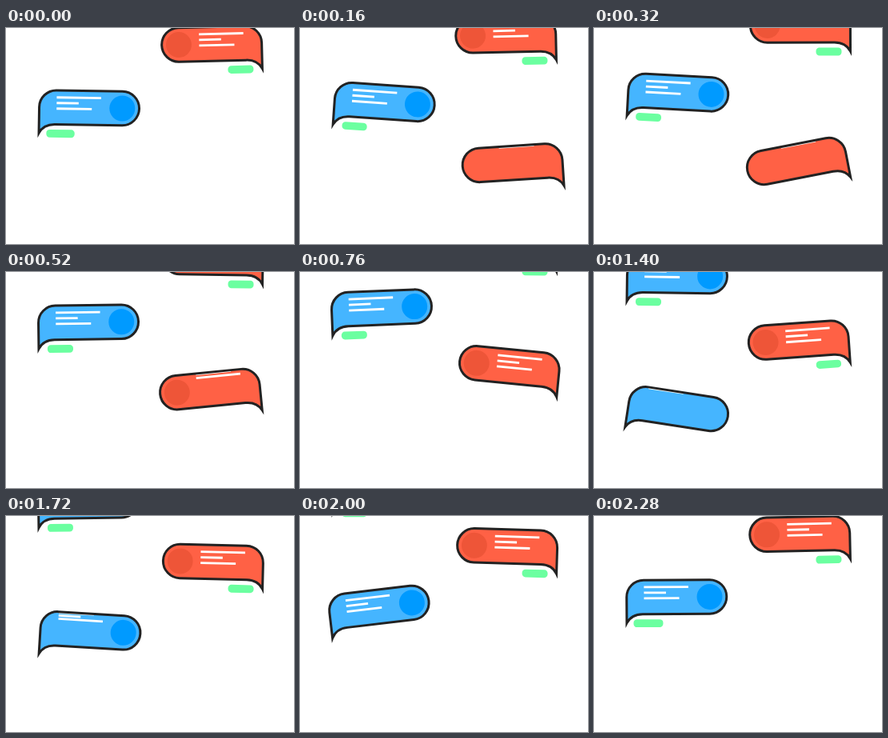
Animation, 360 px wide and 270 px high, one loop 2320 ms. Source, as an HTML page with a canvas:

```html
<!DOCTYPE html>
<html lang="en">
<head>
<meta charset="utf-8">
<title>Chat bubbles</title>
<style>
html, body { margin: 0; width: 100%; height: 100%; overflow: hidden; background: #fff; }
canvas { display: block; width: 360px; height: 270px; }
</style>
</head>
<body>
<canvas id="stage"></canvas>
<script>
const LOOP = 2320, STEP = 40, SPEED = 157 / LOOP;
const canvas = document.getElementById('stage');
const ctx = canvas.getContext('2d');
const dpr = window.devicePixelRatio || 1;
canvas.width = 360 * dpr;
canvas.height = 270 * dpr;

// side is the direction from the tail to the round end
const kinds = [
  { x: 321.5, y: 210.6, side: -1, delay: 0, fill: '#ff6145', disc: '#ee5538' },
  { x: 40, y: 212.6, side: 1, delay: LOOP / 2, fill: '#45b5ff', disc: '#009aff' }
];
const widths = [55.5, 27.5, 44];

// Progress from 0 to 1 between two ages
function ease(age, from, to) {
  const u = Math.min(1, Math.max(0, (age - from) / (to - from)));
  return (1 - Math.cos(Math.PI * u)) / 2;
}

// Damped oscillations
const swing = age =>
  0.276 * Math.exp(-age / 1020) * Math.sin(Math.PI * (age - 115) / 508);
const stretch = age => age < 850 ? 0 :
  1 - Math.exp((850 - age) / 145) * Math.cos(Math.PI * (age - 850) / 270);
const slide = age => 140 * Math.exp(-age / 60);

// The origin is the visible end of the tail
const body = new Path2D(
  'M1 -2.9V-35.25A21.25 21.25 0 0 1 22.25 -56.5H104.75' +
  'A21.25 21.25 0 0 1 104.75 -14H21C12 -14 5 -10.5 1 -2.9Z');

function drawPill(age) {
  const s = stretch(age);
  if (s <= 0) return;
  const w = 32 * s, h = 9.8 * Math.min(1, s);
  ctx.fillStyle = '#6bffa0';
  ctx.beginPath();
  ctx.roundRect(28 - w / 2, -2.5 - h / 2, w, h, Math.min(4.2, h / 2, w / 2));
  ctx.fill();
}

function drawContent(kind, age) {
  ctx.save();
  ctx.clip(body);
  ctx.fillStyle = kind.disc;
  ctx.beginPath();
  ctx.arc(104.75, -35.25, 16 * ease(age, 340, 500), 0, 2 * Math.PI);
  ctx.fill();

  ctx.fillStyle = '#fff';
  widths.forEach((w, i) => {
    const begin = 400 + 80 * i;
    const y = -47.7 + 7 * i - 22 * (1 - ease(age, begin, begin + 160));
    ctx.fillRect(kind.side > 0 ? 22.7 : 79.2 - w, y - 1.4, w, 2.8);
  });
  ctx.restore();
}

function drawBubble(kind, age) {
  const size = ease(age, 40, 160);
  if (size <= 0) return;
  ctx.save();
  ctx.translate(kind.x - kind.side * slide(age), kind.y - age * SPEED);
  ctx.scale(kind.side * size, size);
  ctx.rotate(swing(age));
  drawPill(age);

  ctx.fillStyle = kind.fill;
  ctx.fill(body);
  drawContent(kind, age);

  ctx.strokeStyle = '#222';
  ctx.lineWidth = 3;
  ctx.stroke(body);
  ctx.restore();
}

function draw(now) {
  const t = Math.floor(now / STEP) * STEP % LOOP;
  ctx.setTransform(dpr, 0, 0, dpr, 0, 0);
  ctx.fillStyle = '#fff';
  ctx.fillRect(0, 0, 360, 270);
  for (const kind of kinds) {
    const age = (t - kind.delay + LOOP) % LOOP;
    drawBubble(kind, age + LOOP);
    drawBubble(kind, age);
  }
}

const start = performance.now();
function tick() {
  draw(performance.now() - start);
  requestAnimationFrame(tick);
}
tick();
</script>
</body>
</html>
```
